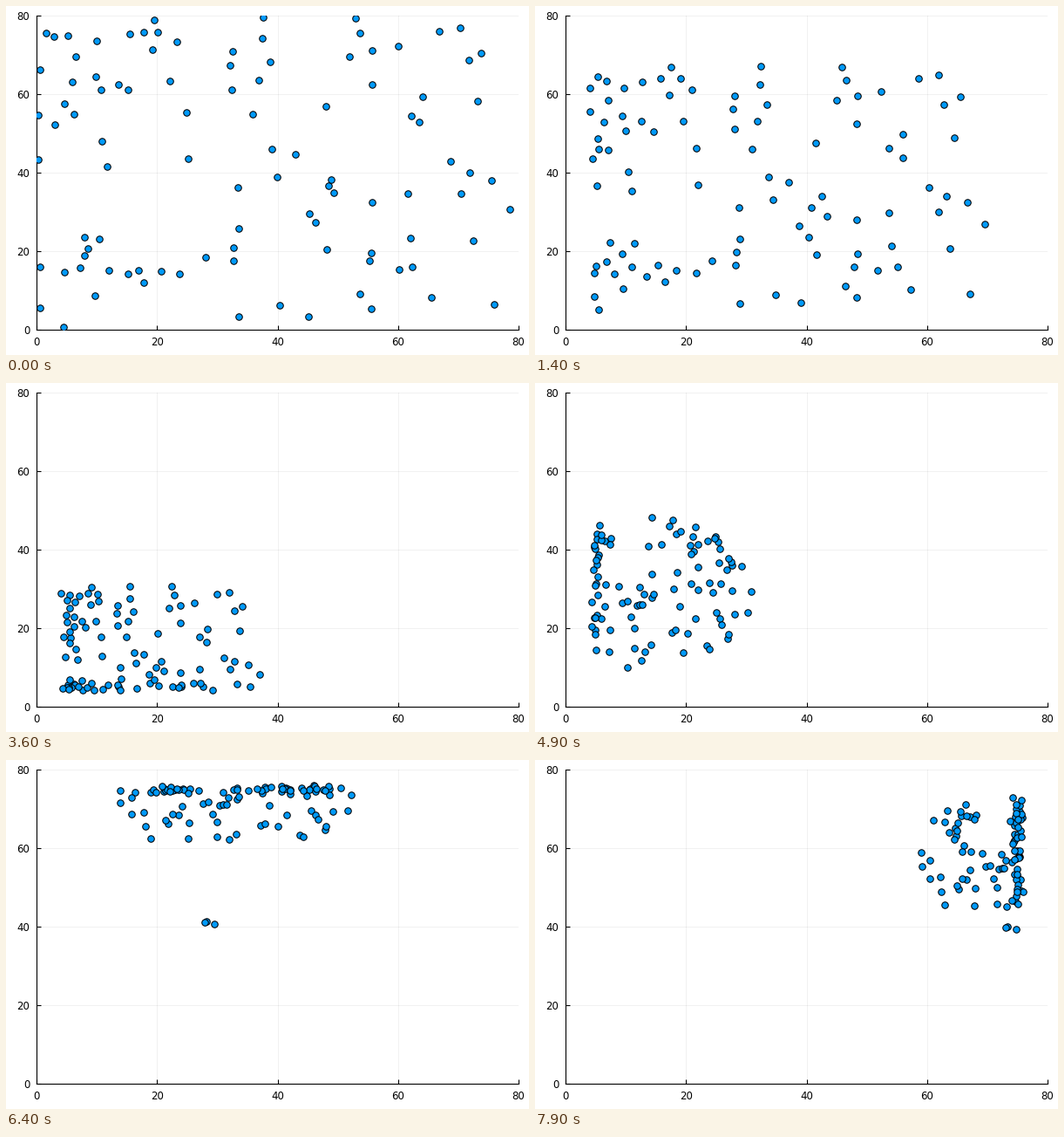
These frames come from a looping animation (600 by 400 pixels, 8 s). A matplotlib script:

```python
import numpy as np
import matplotlib.pyplot as plt
from matplotlib.animation import FuncAnimation

FRAMES, INTERVAL = 80, 100
BIRDS, SIZE = 100, 80
LOW, HIGH = 5, 75  # walls that turn the flock

plt.rcParams["font.family"] = "DejaVu Sans"
rng = np.random.default_rng(12)

start = rng.uniform(0, SIZE, (BIRDS, 2))
square = start / 40 - 1

# the same crowd as a disc, turned clockwise and denser in the middle
u, v = square.T
disc = np.column_stack([v * np.sqrt(1 - u * u / 2), -u * np.sqrt(1 - v * v / 2)])
disc *= np.hypot(*disc.T)[:, None] ** 0.35


def spread(p, gap):
    """Push apart neighbours that are closer than gap."""
    for _ in range(12):
        d = p[:, None] - p[None]
        r = np.hypot(d[..., 0], d[..., 1]) + 1e-9
        push = np.clip(gap - r, 0, None) / r
        p = p + 0.25 * (d * push[..., None]).sum(axis=1)
    return p


def hold(p):
    """Keep the flock between the walls, with a little jitter there."""
    jitter = np.clip(rng.normal(0, 0.45, p.shape), -1, 1.3)
    return np.clip(p, LOW + jitter, HIGH + jitter)


def sheet(x, y, rx, ry, bend):
    """The shrinking square; bend crowds it towards the lower left."""
    p = [x, y] + square * [rx, ry] + bend * square ** 2
    return hold(spread(p, 0.1 * rx))


def blob(x, y, rx, ry):
    return hold([x, y] + disc * [rx, ry])


path = [
    (0, start),
    (14, sheet(34.5, 34, 34.5, 31.5, 2)),
    (24, sheet(30, 22.5, 28.5, 24.5, 3)),
    (36, sheet(16.5, 11.5, 17, 15, 4.5)),
    (49, blob(13.2, 28.6, 17.8, 19.8)),
    (56, blob(20, 53, 15.5, 19.5)),
    (64, blob(32, 73, 20.5, 14.5)),
    (72, blob(53, 62, 22.7, 13)),
    (79, blob(73.2, 57, 16, 16)),
]
times = np.array([t for t, _ in path])
poses = np.array([p for _, p in path])

# three stragglers dip to the floor and trail behind
late = np.argsort(disc[:, 1])[:3]
trail = np.array([(23, 3), (29.3, 40.3), (52, 40), (74.5, 39)])
poses[5:, late] = trail[:, None] + rng.normal(0, 1, (3, 2)) * [1.8, 0.6]

slopes = np.gradient(poses, times, axis=0)
slopes[0] = 0


def flock(t):
    """Cubic Hermite path through the poses."""
    k = min(np.searchsorted(times, t, side="right") - 1, len(times) - 2)
    h = times[k + 1] - times[k]
    s = (t - times[k]) / h
    ease = s * s * (3 - 2 * s)
    return (poses[k] * (1 - ease) + poses[k + 1] * ease
            + h * s * (1 - s) ** 2 * slopes[k]
            - h * s * s * (1 - s) * slopes[k + 1])


fig = plt.figure(figsize=(6, 4), dpi=100, facecolor="white")
ax = fig.add_axes([35.2 / 600, 28.8 / 400, 552.8 / 600, 359.9 / 400])
ax.set(xlim=(0, SIZE), ylim=(0, SIZE),
       xticks=range(0, 81, 20), yticks=range(0, 81, 20))
ax.grid(color="black", alpha=0.055, lw=0.72)
ax.set_axisbelow(True)
ax.spines[["top", "right"]].set_visible(False)
ax.spines[["left", "bottom"]].set_linewidth(0.8)
ax.tick_params(direction="in", length=3.6, width=0.8, labelsize=8.5)
ax.tick_params(axis="x", pad=5.6)
ax.tick_params(axis="y", pad=5.6)

dots, = ax.plot([], [], "o", ms=5.4, mfc="#009AFA", mec="black", mew=0.75,
                zorder=3)


def draw(i):
    dots.set_data(*flock(i).T)
    return dots,


anim = FuncAnimation(fig, draw, frames=FRAMES, interval=INTERVAL, repeat=True,
                     repeat_delay=0)
plt.show()
```
